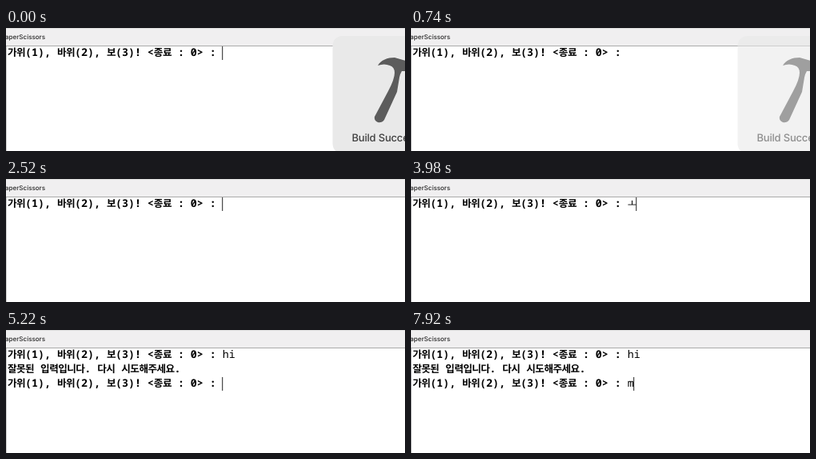
Recreate the animation shown at these times as an HTML page. Size 499x154 px, loop 8000 ms.

```html
<!DOCTYPE html>
<html lang="ko">
<head>
<meta charset="utf-8">
<style>
  html, body { margin: 0; width: 100%; height: 100%; overflow: hidden; background: #fff; }
  svg { display: block; }
  text { white-space: pre; text-rendering: geometricPrecision; }
  .ui { font-family: Inter, sans-serif; font-weight: 500; }
  .code { font: 13.3px "Noto Sans Mono", monospace; }
  .out { font-weight: 700; }
  .ko { font-family: "Noto Sans CJK KR", "Noto Sans CJK JP", sans-serif; font-size: 12.6px; letter-spacing: -.55px; }
</style>
</head>
<body>
<svg width="499" height="154" viewBox="0 0 499 154">
  <rect width="499" height="22" fill="#f0eff0"/>
  <rect width="499" height="1" fill="#dedede"/>
  <rect y="22" width="499" height="1" fill="#aaa"/>
  <rect y="23" width="1" height="131" fill="#cfcfcf"/>
  <text class="ui" x="49" y="14.3" font-size="8" text-anchor="end" fill="#2a2a2a">PaperScissors</text>
  <g id="console"></g>
  <rect id="caret" width="1" height="17" fill="#222"/>
  <g id="hud">
    <rect x="408.5" y="10" width="147" height="147" rx="12" fill="#e9e9e9"/>
    <path fill="#5c5c5c" d="M465 47C469 40 477 37 486 37L503 42V54L495 54Q493 57 492 62L489 80L473 115Q470 119 465 118Q460 116 461 111L478 79Q486 64 486 56Q486 49 480 47Q473 44 465 47Z"/>
    <text class="ui" x="432.5" y="142" font-size="13" letter-spacing="-.2" fill="#404040">Build Succeeded</text>
  </g>
</svg>
<script>
const LOOP = 8000, INPUT_X = 270.7, LATIN = 7.98, HANGUL = 11.04;
const PROMPT = '가위(1), 바위(2), 보(3)! <종료 : 0> : ';
const ERROR = '잘못된 입력입니다. 다시 시도해주세요.';
const $ = id => document.getElementById(id);

// start time, printed rows, current input, caret shown
const steps = [
  [0, 1, '', 1], [540, 1, '', 0], [1200, 1, '', 1], [1860, 1, '', 0], [2520, 1, '', 1],
  [3280, 1, 'ㅗ', 1], [3420, 1, 'ㅗㅑ', 1], [3980, 1, 'ㅗ', 1], [4160, 1, '', 1],
  [4540, 1, 'h', 1], [4700, 1, 'hi', 1],
  [5080, 2, '', 1], [5100, 2, ERROR, 0], [5140, 3, '', 0], [5200, 3, '', 1], [5860, 3, '', 0],
  [6160, 3, 'y', 1], [6340, 3, 'ya', 1], [6880, 3, 'y', 1], [7040, 3, '', 1],
  [7700, 3, '', 0], [7920, 3, 'm', 1]
];

const isHangul = c => /[ㄱ-힣]/.test(c);

function line(row, x, str, cls = '') {
  const body = str.replace(/</g, '&lt;').replace(/[ㄱ-힣]+/g, '<tspan class="ko">$&</tspan>');
  return `<text class="code ${cls}" x="${x}" y="${34.7 + 18 * row}">${body}</text>`;
}

function show([, rows, input, caretOn]) {
  let html = line(0, 2, PROMPT, 'out') + line(0, INPUT_X, rows > 1 ? 'hi' : input);
  if (rows === 2) html += line(1, 2, input, 'out');
  if (rows === 3) html += line(1, 2, ERROR, 'out') + line(2, 2, PROMPT, 'out') + line(2, INPUT_X, input);
  $('console').innerHTML = html;

  const width = [...input].reduce((w, c) => w + (isHangul(c) ? HANGUL : LATIN), 0);
  $('caret').setAttribute('x', (rows === 2 ? 2 : INPUT_X) + width - .5);
  $('caret').setAttribute('y', 5 + 18 * rows);
  $('caret').style.opacity = caretOn;
}

let current;
const start = performance.now();
function frame() {
  const t = (performance.now() - start) % LOOP;
  const step = steps.findLast(s => s[0] <= t);
  if (step !== current) show(current = step);
  $('hud').style.opacity = Math.max(0, Math.min(1, (880 - t) / 210)) ** 1.3;
  requestAnimationFrame(frame);
}
frame();
</script>
</body>
</html>
```
